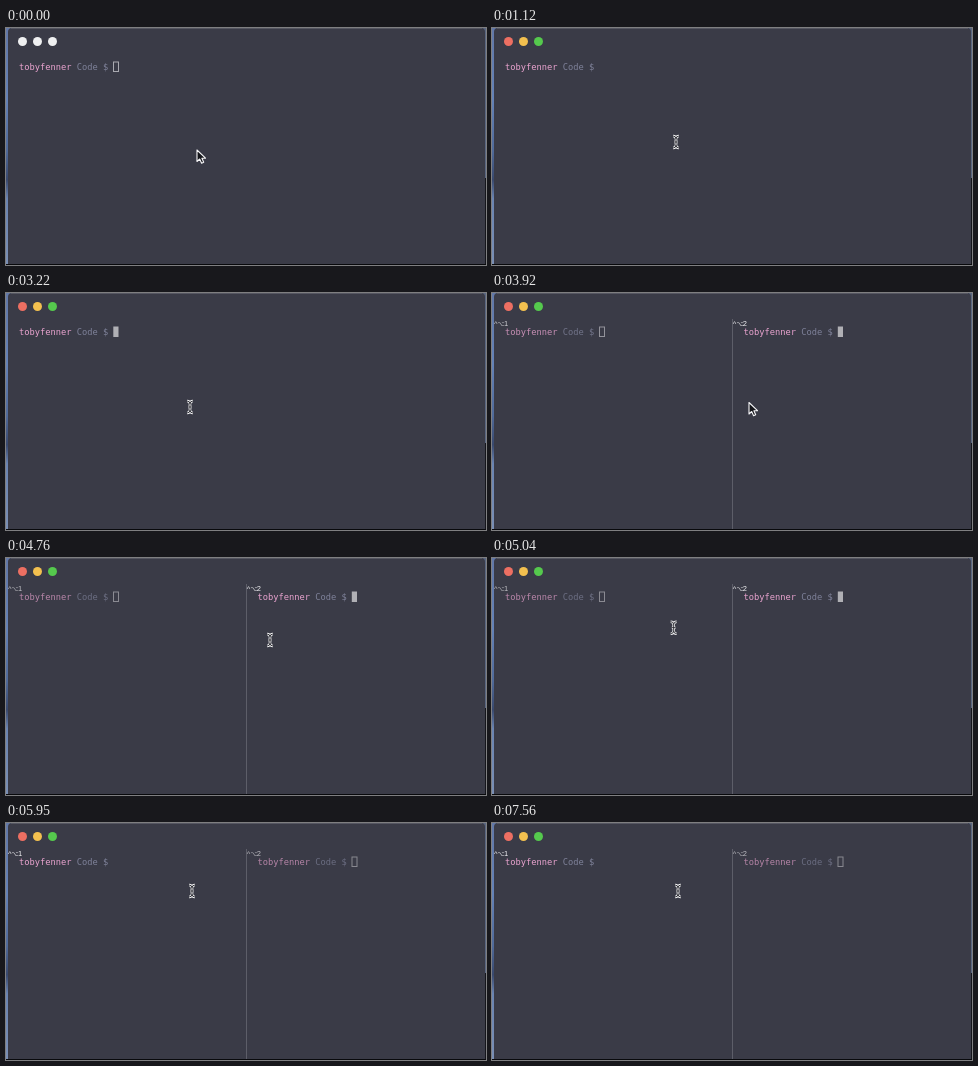
These frames come from a looping animation (480 px wide and 237 px high, 8000 ms). An HTML page:

```html
<!DOCTYPE html>
<html lang="en">
<head>
<meta charset="utf-8">
<title>Terminal split panes</title>
<style>
  html, body { margin: 0; width: 100%; height: 100%; overflow: hidden; background: #3a3b47; }
  svg { display: block; width: 480px; height: 237px; }
  .line { font: 8.72px "DejaVu Sans Mono", monospace; white-space: pre; }
  .user { fill: #eaa4d0; }
  .path { fill: #7f829a; }
  .label { font: 7.5px "Liberation Sans", sans-serif; fill: #f4f4f6; }
  .label .opt { font: 6px "DejaVu Sans", sans-serif; }
  .block { fill: #b0b0b5; }
  .hollow { fill: none; stroke: #a9a9b0; stroke-width: 1; }
  .halo { fill: none; stroke: #f2f2f4; stroke-width: 2.5; }
  .core { fill: none; stroke: #24252c; stroke-width: .9; }
</style>
</head>
<body>
<svg viewBox="0 0 480 237">
  <defs>
    <linearGradient id="desk" x2="0" y2="1">
      <stop offset="0" stop-color="#6278a8"/>
      <stop offset=".3" stop-color="#6482b8"/>
      <stop offset=".52" stop-color="#506a9a"/>
      <stop offset=".64" stop-color="#39496e"/>
      <stop offset=".72" stop-color="#6a84b2"/>
      <stop offset="1" stop-color="#7a8fb5"/>
    </linearGradient>
    <path id="beam" d="M-3-6Q0-6 0-3V3Q0 6-3 6M3-6Q0-6 0-3M3 6Q0 6 0 3M-1.8 0H1.8"/>
    <g id="prompt">
      <text class="line" x="13" y="42"><tspan class="user">tobyfenner</tspan><tspan class="path"> Code $</tspan></text>
    </g>
  </defs>
  <rect width="480" height="237" fill="url(#desk)"/>
  <rect x="470" width="10" height="150" fill="#596681"/>
  <rect x="470" y="150" width="10" height="87" fill="#14151b"/>
  <rect y="236" width="480" height="1" fill="#08090c"/>
  <path d="M2 236V4Q2 0 6 0H475Q479 0 479 4V236Z" fill="#3a3b47"/>
  <path d="M5 .5H476" stroke="#555661"/>
  <g id="lights">
    <circle cx="16.5" cy="13.5" r="4.5"/>
    <circle cx="31.5" cy="13.5" r="4.5"/>
    <circle cx="46.5" cy="13.5" r="4.5"/>
  </g>
  <g id="left">
    <use href="#prompt"/>
    <rect class="block" x="107.3" y="33.5" width="5.2" height="10.5"/>
    <rect class="hollow" x="107.5" y="34" width="5" height="9.5"/>
    <text class="label split" y="32.5"><tspan x="2">^</tspan><tspan class="opt" x="5.6">⌥</tspan><tspan x="12">1</tspan></text>
  </g>
  <path class="split" d="M240.5 26V236" stroke="#5d5e69"/>
  <g id="right" class="split" transform="translate(238.5 0)">
    <use href="#prompt"/>
    <rect class="block" x="107.3" y="33.5" width="5.2" height="10.5"/>
    <rect class="hollow" x="107.5" y="34" width="5" height="9.5"/>
    <text class="label" y="32.5"><tspan x="2.3">^</tspan><tspan class="opt" x="5.9">⌥</tspan><tspan x="12.3">2</tspan></text>
  </g>
  <g id="mouse">
    <path id="arrow" d="M0 0V11.5L2.7 9 4.6 13.2 6.7 12.3 4.9 8.2H8.5Z" fill="#15161b" stroke="#f6f6f8" stroke-width="1.1" stroke-linejoin="round"/>
    <g id="ibeam"><use href="#beam" class="halo"/><use href="#beam" class="core"/></g>
  </g>
</svg>
<script>
const LOOP = 8000, TICK = 70;
const $ = id => document.getElementById(id);
const lights = [...$("lights").children];
const splitParts = [...document.querySelectorAll(".split")];

// Step tables: [start ms, value]
const FOCUS = [[0, false], [280, true]];
const SPLIT = [[0, false], [3500, true]];
const POINTER = [[0, "arrow"], [210, "ibeam"], [3780, "arrow"], [4340, "ibeam"]];
const LEFT = [[0, "hollow"], [280, "block"], [910, ""], [1540, "block"], [2170, ""],
  [2730, "block"], [3360, ""], [3500, "hollow"], [5250, "block"], [5880, ""]];
const RIGHT = [[0, "block"], [4060, ""], [4620, "block"], [5180, ""], [5250, "hollow"]];

// Motion tables: [ms, ...values]
const MOUSE = [[0, 191, 122], [70, 190, 121], [210, 184, 114], [3710, 184, 114],
  [3920, 257, 109.5], [4200, 264, 86], [4550, 264, 86], [4760, 264, 82],
  [5180, 140.5, 63.5], [5390, 140.5, 63.5], [5530, 158, 65], [5740, 186, 68]];
const LEFT_ALPHA = [[0, 1], [3500, 1], [3780, .85], [4200, .72], [5180, .72], [5320, 1]];
const RIGHT_ALPHA = [[0, 1], [5180, 1], [5390, .7]];

const step = (table, t) => table.findLast(row => row[0] <= t)[1];

function tween(table, t) {
  const i = table.findLastIndex(row => row[0] <= t);
  const [t0, ...from] = table[i];
  const [t1, ...to] = table[i + 1] || [t0 + 1, ...from];
  const k = Math.min(1, (t - t0) / (t1 - t0));
  return from.map((v, j) => v + (to[j] - v) * k);
}

const show = (el, on) => el.setAttribute("visibility", on ? "visible" : "hidden");

function drawPane(id, cursor, alpha, visible) {
  const pane = $(id);
  pane.setAttribute("opacity", alpha);
  for (const kind of ["block", "hollow"])
    show(pane.querySelector("." + kind), visible && cursor === kind);
}

function draw(time) {
  const t = Math.floor(time % LOOP / TICK) * TICK;
  const focused = step(FOCUS, t), split = step(SPLIT, t), pointer = step(POINTER, t);
  const colors = focused ? ["#ed6f62", "#f3c04f", "#55c94d"] : Array(3).fill("#eff0f1");
  lights.forEach((dot, i) => dot.setAttribute("fill", colors[i]));
  splitParts.forEach(el => show(el, split));
  drawPane("left", step(LEFT, t), tween(LEFT_ALPHA, t)[0], true);
  drawPane("right", step(RIGHT, t), tween(RIGHT_ALPHA, t)[0], split);
  show($("arrow"), pointer === "arrow");
  show($("ibeam"), pointer === "ibeam");
  $("mouse").setAttribute("transform", `translate(${tween(MOUSE, t)})`);
}

const start = performance.now();
function frame() {
  draw(performance.now() - start);
  requestAnimationFrame(frame);
}
frame();
</script>
</body>
</html>
```
